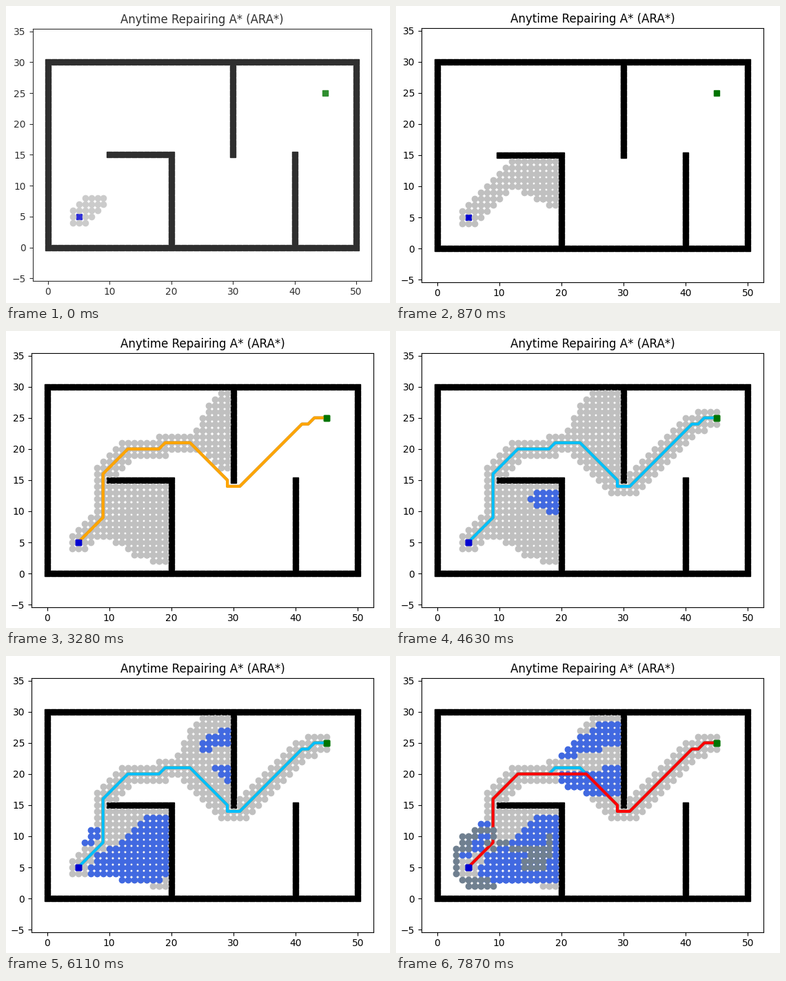
Animation, 557 px wide and 430 px high, one loop 8000 ms. Source, as a matplotlib script:

```python
import math

import matplotlib.pyplot as plt
from matplotlib.animation import FuncAnimation
from matplotlib.patches import Rectangle

W, H, DPI = 557, 430, 100
LOOP, TICK = 8000, 40
CHUNK = 20  # cells revealed per redraw
START, GOAL = (5, 5), (45, 25)
MOVES = [(1, 0), (1, -1), (1, 1), (0, 1), (-1, 1), (-1, 0), (-1, -1), (0, -1)]

# Maze
walls = {(x, y) for x in range(51) for y in (0, 30)}
walls |= {(x, y) for x in (0, 50) for y in range(31)}
walls |= {(x, 15) for x in range(10, 21)} | {(20, y) for y in range(15)}
walls |= {(30, y) for y in range(15, 30)} | {(40, y) for y in range(16)}


class Planner:
    """Anytime repairing A*: each run lowers the heuristic weight."""

    def __init__(self):
        self.cost = {START: 0.0, GOAL: math.inf}
        self.parent = {START: START}
        self.queue, self.late = {START: 0.0}, set()

    def f(self, s, weight):
        return self.cost[s] + weight * math.hypot(GOAL[0] - s[0], GOAL[1] - s[1])

    def run(self, weight):
        pending = list(self.queue) + [s for s in self.late if s not in self.queue]
        self.queue = {s: self.f(s, weight) for s in pending}
        self.late = set()
        closed, seen = set(), []
        while self.queue:
            s = min(self.queue, key=self.queue.get)
            if self.cost[GOAL] <= self.queue[s]:
                break
            del self.queue[s]
            closed.add(s)
            for dx, dy in MOVES:
                n = (s[0] + dx, s[1] + dy)
                if n in walls:
                    continue
                cut = (n[0], s[1]) in walls or (s[0], n[1]) in walls
                c = self.cost[s] + (math.inf if cut else math.hypot(dx, dy))
                if n not in self.cost or c < self.cost[n]:
                    self.cost[n], self.parent[n] = c, s
                    seen.append(n)
                    if n in closed:
                        self.late.add(n)
                    else:
                        self.queue[n] = self.f(n, weight)
        return [s for s in seen if s not in (START, GOAL)]

    def path(self):
        cells = [GOAL]
        while cells[-1] != START:
            cells.append(self.parent[cells[-1]])
        return cells[::-1]


# Figure
fig = plt.figure(figsize=(W / DPI, H / DPI), dpi=DPI, facecolor="white")
ax = fig.add_axes([0.1, 0.1, 0.8, 0.8])
LEFT, RIGHT, TOP, BOTTOM = 37, 533, 32.24, 399.53
half = 27.5 * (BOTTOM - TOP) / (RIGHT - LEFT)
ax.set(xlim=(-2.5, 52.5), ylim=(15 - half, 15 + half),
       xticks=range(0, 51, 10), yticks=range(-5, 36, 5))
title = ax.set_title("Anytime Repairing A* (ARA*)", fontsize=12)
veil = fig.add_artist(Rectangle((0, 0), 1, 1, color="white", lw=0, zorder=50))


def markers(cells, color, shape):
    return ax.plot([x for x, _ in cells], [y for _, y in cells],
                   color=color, marker=shape, ms=6, ls="")[0]


def ends():
    return [markers([START], "#0000d0", "s"), markers([GOAL], "#007400", "s")]


ends()
markers(sorted(walls), "black", "s")

# weight, dot colour, first redraw, redraw period, path colour, path time
STAGES = [
    (2.5, "silver", 0, 138, "gray", 2600),
    (2.1, "wheat", 2700, 140, "orange", 3280),
    (1.7, "lightskyblue", 3380, 140, "deepskyblue", 3940),
    (1.3, "royalblue", 4630, 160, "red", 6670),
    (0.9, "slategray", 7460, 200, "m", LOOP),
]

planner = Planner()
dot_layers, path_layers = [], []
for weight, dot_color, begin, period, path_color, path_time in STAGES:
    cells = planner.run(weight)
    dot_layers.append((markers([], dot_color, "o"), cells, begin, period))
    line, = ax.plot(*zip(*planner.path()), lw=3, color=path_color)
    path_layers.append((path_time, [line] + ends()))


def zoom(s):
    x0, x1 = (230 + (x - 230) * s for x in (LEFT, RIGHT))
    y0, y1 = (170 + (y - 170) * s for y in (TOP, BOTTOM))
    ax.set_position([x0 / W, 1 - y1 / H, (x1 - x0) / W, (y1 - y0) / H])
    title.set_fontsize(12 * s)
    ax.tick_params(labelsize=10 * s)
    for line in ax.lines:
        line.set_markersize(6 * s)


def draw(i):
    t = i * TICK + 30
    # the window fades and grows in
    left = (1 - min(1, max(0, (t - 40) / 160))) ** 2
    zoom(1 - 0.0085 * left)
    veil.set_alpha(0.19 * left)
    for art, cells, begin, period in dot_layers:
        redraws = max(0, (t - begin) // period + 1)
        shown = cells[:CHUNK * redraws]
        art.set_data([x for x, _ in shown], [y for _, y in shown])
    for when, arts in path_layers:
        for art in arts:
            art.set_visible(t >= when)
    return []


anim = FuncAnimation(fig, draw, frames=LOOP // TICK, interval=TICK,
                     repeat=True, repeat_delay=0, blit=False)
plt.show()
```
